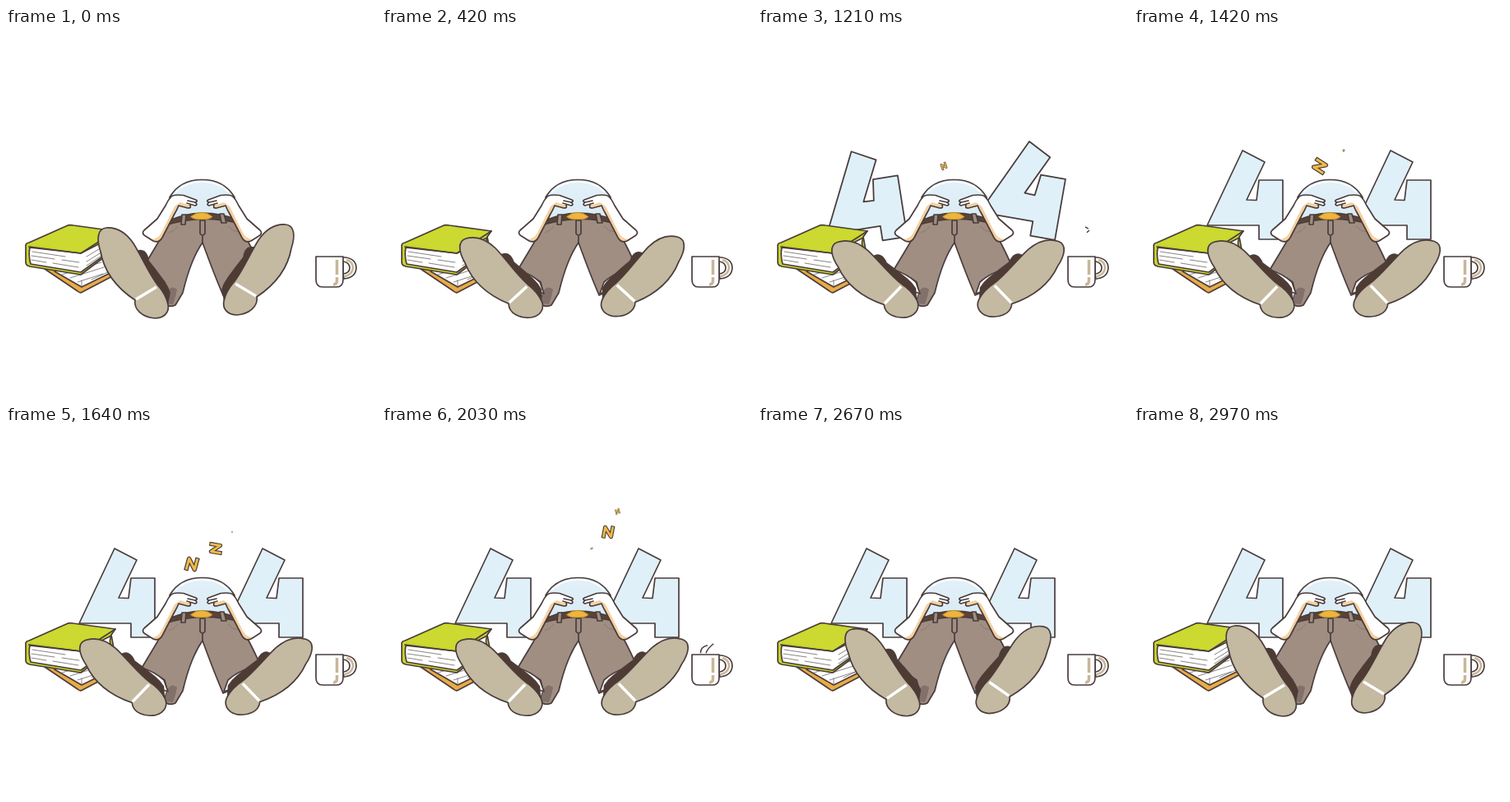
Animation, 450 px wide and 450 px high, one loop 3000 ms. Source, as an HTML page:

```html
<!DOCTYPE html>
<html lang="en">
<head>
<meta charset="utf-8">
<title>404</title>
<style>
  html, body { margin: 0; width: 100%; height: 100%; overflow: hidden; background: #fff; }
  svg { display: block; width: 100%; height: 100%; }
  .o { stroke: #4a3d3c; stroke-width: 1.7; stroke-linejoin: round; stroke-linecap: round; }
  .thin { fill: none; stroke: #5a504e; stroke-width: .7; stroke-linecap: round; }
  .none { fill: none; }
</style>
</head>
<body>
<svg viewBox="0 0 450 450">
  <defs>
    <path id="four" class="o" fill="#dff0f9" stroke-linejoin="miter"
      d="M-3-54 24-40 2 6 14 6.5 17-18H46V54H17V37H-46Z"/>
    <linearGradient id="shirt" x1="0" y1="0" x2="0" y2="1">
      <stop offset="0" stop-color="#e3f1f9"/><stop offset="1" stop-color="#d9ebf5"/>
    </linearGradient>
    <g id="arm">
      <path fill="#fff" d="M231 210 216 204Q205 202 201 205 197 209 194 216L184 232 168 246Q165 249 168 252L179 259Q186 262 190 255L205 226 210 216 222 219Q226 218 232 215Z"/>
      <path fill="#f5d0a0" d="M205 217 189 249Q184 258 175 257L179 259Q186 262 190 255L205 226 210 216 222 219 225 216 212 212Z"/>
      <path class="o none" d="M210 216Q208 221 205 226L190 255Q186 262 179 259L168 252Q165 249 168 246L184 232 194 216Q197 209 201 205 205 202 216 203.5L231 209Q234 211 230 212L221 210M230 212Q234 215 230 216L220 213M224 215.5Q226 219 221 219L210 216"/>
    </g>
    <g id="shoe">
      <path class="o" fill="#503b33" d="M157 272Q164 269 168 272 172 275 173 283 182 294 192 308 197 315 199 322L196 337 170 310Z"/>
      <path class="o" fill="#c4b9a1" d="M122 243C111 244 110 257 115 272 119 295 133 315 157 331 155 343 167 352 181 353 193 353 199 345 197 336 195 326 190 319 184 312 174 299 165 278 155 262 146 249 135 242 122 243Z"/>
      <path fill="none" stroke="#fff" stroke-width="3.5" d="M158 330 183 315"/>
    </g>
    <path id="sock" class="o" fill="#fff" d="M165 294Q181 299 192 309L197 323 188 320 163 303Z"/>
    <g id="zed" fill="none" stroke-linejoin="round" stroke-linecap="square">
      <path stroke="#4d4038" stroke-width="5" d="M-6-4.5H5L-5 4.5H6"/>
      <path stroke="#efb94b" stroke-width="2.7" d="M-6-4.5H5L-5 4.5H6"/>
    </g>
  </defs>

  <use href="#four" id="fourLeft"/>
  <use href="#four" id="fourRight"/>

  <g id="books">
    <path class="o" fill="#e9ab46" d="M47 293 103 270 153 284 152 290 93 321Q90 323 87 320Z"/>
    <path class="o" fill="#fff" d="M59 296 92 315 145 289 128 273Z"/>
    <path class="thin" d="M68 300 116 285M78 304 119 291M87 309 118 299M92 314V307M104 306 137 291"/>
    <path class="o" fill="#c8d42b" d="M24 266Q23 262 28 261L73 241Q77 239 82 240L133 247 128 254 131 270 91 300 29 290Q24 289 24 285Z"/>
    <path class="o" fill="#fff" d="M29 267 91 274 128 255Q124 264 130 269L91 297 30 287Q27 276 29 267Z"/>
    <path fill="#cbd930" d="M27 263 77 241 130 248 92 272Z"/>
    <path class="o none" d="M28 266 91 274 133 247"/>
    <path class="thin" d="M32 272 72 278M31 277 59 281M68 282 89 285M31 282 49 285M57 286 88 291M98 278 123 263M98 284 116 273M98 289 125 271"/>
  </g>

  <path class="o" fill="url(#shirt)" d="M199 232V206C207 192 221 184.5 238.500 184.500S270 192 278 206V232Z"/>
  <path fill="none" stroke="#fff" stroke-width="1.5" d="M206 200C215 191 226 187 238 187S262 191 271 200"/>

  <path class="o" fill="#a08e82" d="M196 235Q192 250 182 266L164 296Q181 300 193 309L196 322 192 334Q197 341 206 337L215 322Q220 301 226 286T239 261Q246 280 251 293T264 325L288 315 310 292Q301 272 294 259 287 247 284 235 239 221 196 235Z"/>
  <path fill="#81716a" d="M196 320Q202 312 208 318 206 329 203 336L193 335Z"/>
  <path fill="none" stroke="#8b796e" stroke-width="1" d="M209 241Q205 247 198 249M270 241Q275 247 282 248"/>
  <path class="o" fill="#5b4335" d="M195 236Q216 225 239 225T284 234L284 238Q262 232 239 232.500T194 240Z"/>
  <path fill="#edb53c" stroke="#bd892f" d="M224.500 229.500Q238 219 251 229.500 248 233 238 233T224.500 229.500Z"/>
  <path class="o" fill="#a08e82" d="M214 227H219L218 239H213ZM260 226H265L268 237H262ZM236 234H242V250Q239 254 236 250Z"/>
  <path class="o none" d="M239 253V261" stroke-width="1"/>

  <use href="#arm"/>
  <use href="#arm" transform="translate(477 0) scale(-1 1)"/>

  <use href="#sock"/>
  <use href="#shoe" id="shoeLeft"/>
  <g transform="translate(462 -4) scale(-1 1)">
    <use href="#sock" y="4"/>
    <use href="#shoe" id="shoeRight"/>
  </g>

  <g id="cup">
    <path class="o" fill="#fff" d="M407 279H413Q426 281 426 292 425 304 411 305Z"/>
    <path fill="none" stroke="#c8b698" stroke-width="2.500" d="M414 282Q422 284 422 292 421 300 412 302"/>
    <path class="o" fill="#fff" d="M410 284Q418 285 418 292 418 298 410 299Z"/>
    <path class="o" fill="#fff" d="M377 278H410V306Q410 315 402 315H385Q377 315 377 306Z"/>
    <path fill="none" stroke="#c8b698" stroke-width="3.500" d="M402.500 282V300M402.500 303V307Q402.500 312 398 312"/>
  </g>
  <g fill="none" stroke="#4a4444" stroke-width="1.5">
    <path class="steam" pathLength="1" d="M387.500 277C387 271 391 268 395 267 402 265 404 261 400 257 397 253 398 250 403 246"/>
    <path class="steam" pathLength="1" d="M394 277C395 271 399 269 403 265 408 261 410 256 406 252 402 248 405 245 398 242"/>
  </g>

  <use href="#zed" class="zed"/>
  <use href="#zed" class="zed"/>
  <use href="#zed" class="zed"/>
  <use href="#zed" class="zed"/>
</svg>
<script>
const LOOP = 3000;
const byId = id => document.getElementById(id);
const all = selector => [...document.querySelectorAll(selector)];
const lerp = (a, b, k) => a + (b - a) * k;
const span = (t, from, to) => Math.min(1, Math.max(0, (t - from) / (to - from)));
const easeInOut = k => (1 - Math.cos(Math.PI * k)) / 2;
const easeOut = k => 1 - (1 - k) ** 2;

const steam = all('.steam');
const zeds = all('.zed');
const zedSpots = [
  { x: 226, y: 168, start: 1150, size: 1.1 },
  { x: 255, y: 149, start: 1400, size: 1 },
  { x: 275, y: 129, start: 1630, size: 1 },
  { x: 286.5, y: 104, start: 1960, size: .75 }
];

function place(el, x, y, angle, scale) {
  el.setAttribute('transform', `translate(${x} ${y}) rotate(${angle}) scale(${scale})`);
  el.style.display = scale > 0.01 ? '' : 'none';
}

function drawFeet(t) {
  const spread = easeInOut(span(t, 0, 620)) - easeInOut(span(t, 2210, 2910));
  const pose = (el, dy) => el.setAttribute('transform',
    `translate(${-4 * spread} ${dy * spread}) rotate(${-15 * spread} 178 333)`);
  pose(byId('shoeLeft'), 0);
  pose(byId('shoeRight'), 3);
}

// Each digit bursts out from behind the body, overshoots and settles.
function drawFours(t) {
  const grow = easeOut(span(t, 1040, 1190));
  const over = 1.22 * (1 - easeOut(span(t, 1190, 1400)));
  const four = (el, x, dx, dy, turn) => place(el,
    lerp(237, x + dx * over, grow), lerp(240, 203 + dy * over, grow),
    turn * over, grow * (1 + .045 * over));
  four(byId('fourLeft'), 135, -9.8, 2.5, -9);
  four(byId('fourRight'), 315, 8.5, -9, 10);
}

function drawSteam(t) {
  const u = t < 1500 ? span(t, 540, 1240) : span(t, 1900, 2600);
  const head = Math.min(1, u * 1.9);
  const tail = u ** 2.5;
  for (const path of steam) {
    path.style.display = head - tail > .005 ? '' : 'none';
    path.setAttribute('stroke-dasharray', `${head - tail} 3`);
    path.setAttribute('stroke-dashoffset', -tail);
  }
}

function drawZeds(t) {
  zedSpots.forEach(({ x, y, start, size }, i) => {
    const age = t - start;
    const scale = size * easeOut(span(age, 0, 220)) * (1 - span(age, 540, 650));
    place(zeds[i], x, y, lerp(-120, 105, easeInOut(span(age, 0, 440))), scale);
  });
}

function draw(t) {
  drawFeet(t);
  drawFours(t);
  drawSteam(t);
  drawZeds(t);
}

function tick() {
  draw(performance.now() % LOOP);
  requestAnimationFrame(tick);
}
tick();
</script>
</body>
</html>
```
